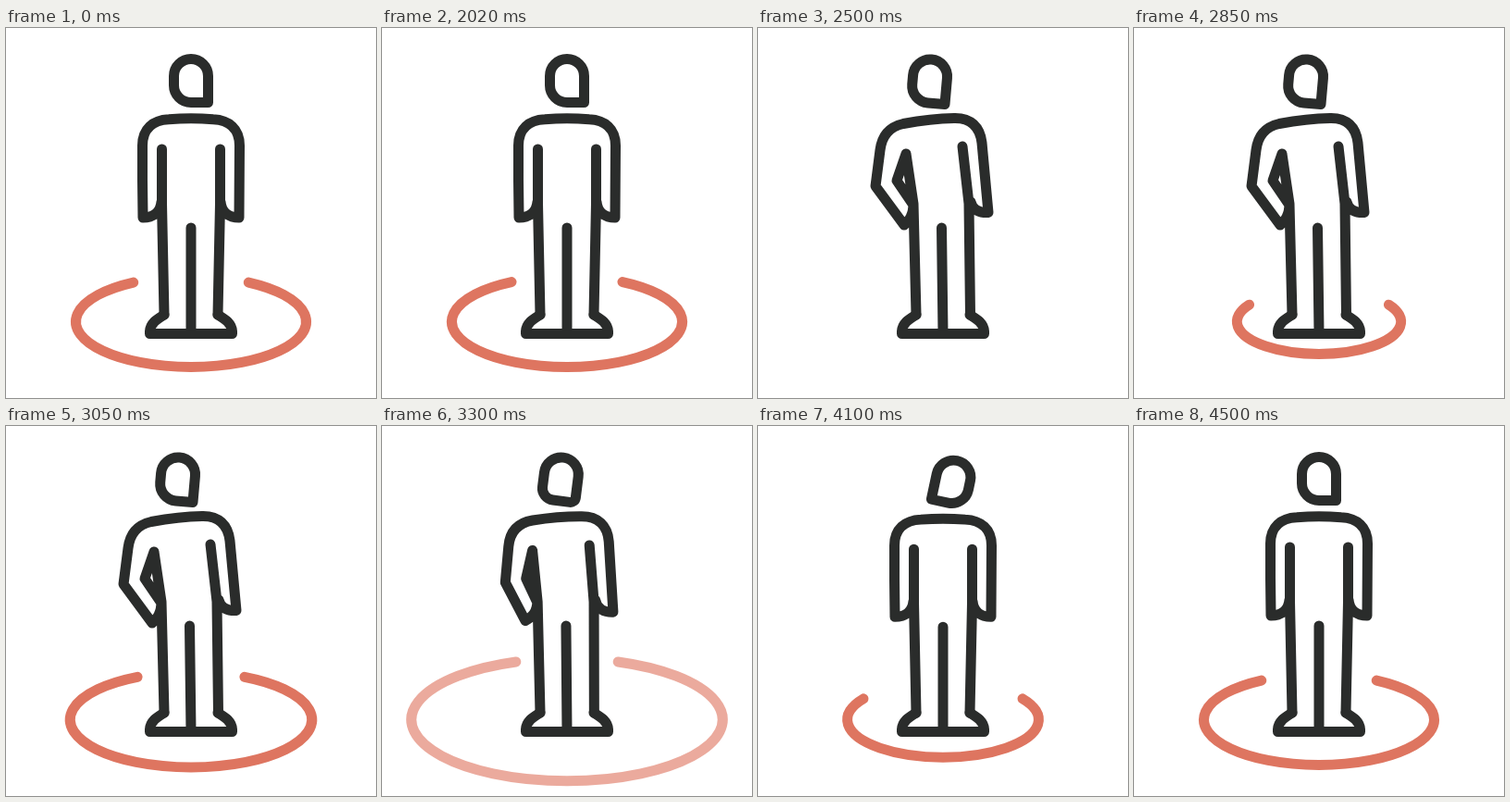
Animation, 400 px wide and 400 px high, one loop 4.52 s. Source, as an HTML page:

```html
<!DOCTYPE html>
<html lang="en">
<head>
<meta charset="utf-8">
<title>Standing person</title>
<style>
  html, body { margin: 0; width: 100%; height: 100%; overflow: hidden; background: #fff; }
  svg { display: block; width: 100vw; height: 100vh; }
  path { fill: none; stroke: #2a2c2b; stroke-width: 11; stroke-linecap: round; stroke-linejoin: round; }
  #ring { stroke: #de7560; }
</style>
</head>
<body>
<svg viewBox="0 0 400 400">
  <g id="person">
    <path id="body"/>
    <path id="head"/>
  </g>
  <path d="M171 310C163 315 156 319 155.5 328V330.5H244.5V328C244 319 237 315 229 310"/>
  <path id="ring"/>
</svg>
<script>
const LOOP = 4520;
const $ = id => document.getElementById(id);
const person = $('person'), body = $('body'), head = $('head'), ring = $('ring');

const clamp = x => Math.min(1, Math.max(0, x));
const span = (t, a, b) => clamp((t - a) / (b - a));
const mix = (a, b, k) => a + (b - a) * k;
const smooth = u => u < 0.5 ? 4 * u ** 3 : 1 - 4 * (1 - u) ** 3;
const easeOut = (u, p) => 1 - (1 - u) ** p;

// Both poses share one path structure, so their numbers can be blended.
const UPRIGHT =
  'M168 188C167 199 159 205 148 205L147.5 165L147.5 127C147.5 109 159 99.5 176 98.7' +
  'Q200 97 224 98.7C241 99.5 252.5 109 252.5 127L252 205C241 205 233 199 232 188' +
  'M168.5 131L168.5 165L168.5 190M168.5 131L168.5 190L171 310' +
  'M231.5 131L231.5 190L229 310M200 216L200 330';
const HAND_ON_HIP =
  'M168 190C168 203 163 208 158 213L127 171L132 132C134 116 142 107 157 103.5' +
  'Q187 98 212 97.5C230 97 240 107 242 124L249 199.5C240 200 232 197 230 188' +
  'M160 136L150 165L167 190M160 136L168 190L171 310' +
  'M221 128L228 190L229.5 310M198.5 216L200 330';
const hipNumbers = HAND_ON_HIP.match(/[\d.]+/g).map(Number);

function bodyPath(k) {
  let i = 0;
  return UPRIGHT.replace(/[\d.]+/g, n => mix(+n, hipNumbers[i++], k).toFixed(2));
}

// x, y, tilt, facing (0: chin on the right, 1: chin on the left)
const FRONT = [200, 57, 0, 0], LEAN = [185.6, 57.5, 5, 0], LOOK = [210.4, 57.4, 12, 1];

function headPose(t) {
  const [a, b, u] = t < 3080 ? [FRONT, LEAN, span(t, 2020, 2480)]
    : t < 4000 ? [LEAN, LOOK, span(t, 3080, 3600)]
    : [LOOK, FRONT, span(t, 4050, 4490)];
  return a.map((v, i) => mix(v, b[i], smooth(u)));
}

function drawHead(t) {
  const [x, y, tilt, facing] = headPose(t);
  const r = 18.5, h = 23.5, right = r * facing, left = r - right;
  const arc = q => `A${q} ${q} 0 0 1 `;
  head.setAttribute('d', `M${-r} -5${arc(r)}${r} -5V${h - right}${arc(right)}${r - right} ${h}` +
    `H${left - r}${arc(left)}${-r} ${h - left}Z`);
  head.setAttribute('transform', `translate(${x} ${y}) rotate(${tilt})`);
}

// size, half opening measured from the bottom in degrees, opacity
function ringState(t) {
  if (t < 2010) return [1, 150, 1];
  if (t < 2490) {
    const u = span(t, 2010, 2490);
    return [mix(1, 1.42, (1 - Math.cos(Math.PI * u)) / 2), mix(150, 161, easeOut(u, 5)), fade(u)];
  }
  if (t < 2650) return null;
  if (t < 3480) {
    const u = span(t, 2650, 3480);
    return [mix(0.3, 1.45, easeOut(u, 1.6)), mix(28, 161, easeOut(u, 4.4)), fade(u)];
  }
  if (t < 3640) return null;
  const u = span(t, 3640, 4500);
  return [mix(0.3, 1, easeOut(u, 1.85)), mix(28, 150, easeOut(u, 2)), 1];
}

function fade(u) {
  return 1 - span(u, 0.65, 1);
}

function drawRing(t) {
  const state = ringState(t);
  ring.style.opacity = state ? state[2] : 0;
  if (!state) return;
  const [size, deg] = state, a = deg * Math.PI / 180;
  const rx = 124.5 * size, ry = 49 * size;
  const dx = rx * Math.sin(a), y = 317.5 + ry * Math.cos(a);
  ring.setAttribute('d', `M${200 - dx} ${y}A${rx} ${ry} 0 ${deg > 90 ? 1 : 0} 0 ${200 + dx} ${y}`);
}

function draw(t) {
  const hip = smooth(span(t, 2020, 2480)) - smooth(span(t, 3080, 3600));
  body.setAttribute('d', bodyPath(hip));
  drawHead(t < 2020 ? 0 : t);
  const dip = 4 * Math.sin(Math.PI * span(t, 4000, 4480));
  person.setAttribute('transform', `translate(0 330) scale(1 ${1 - dip / 232}) translate(0 -330)`);
  drawRing(t);
}

const start = performance.now();
function tick() {
  draw((performance.now() - start) % LOOP);
  requestAnimationFrame(tick);
}
tick();
</script>
</body>
</html>
```
